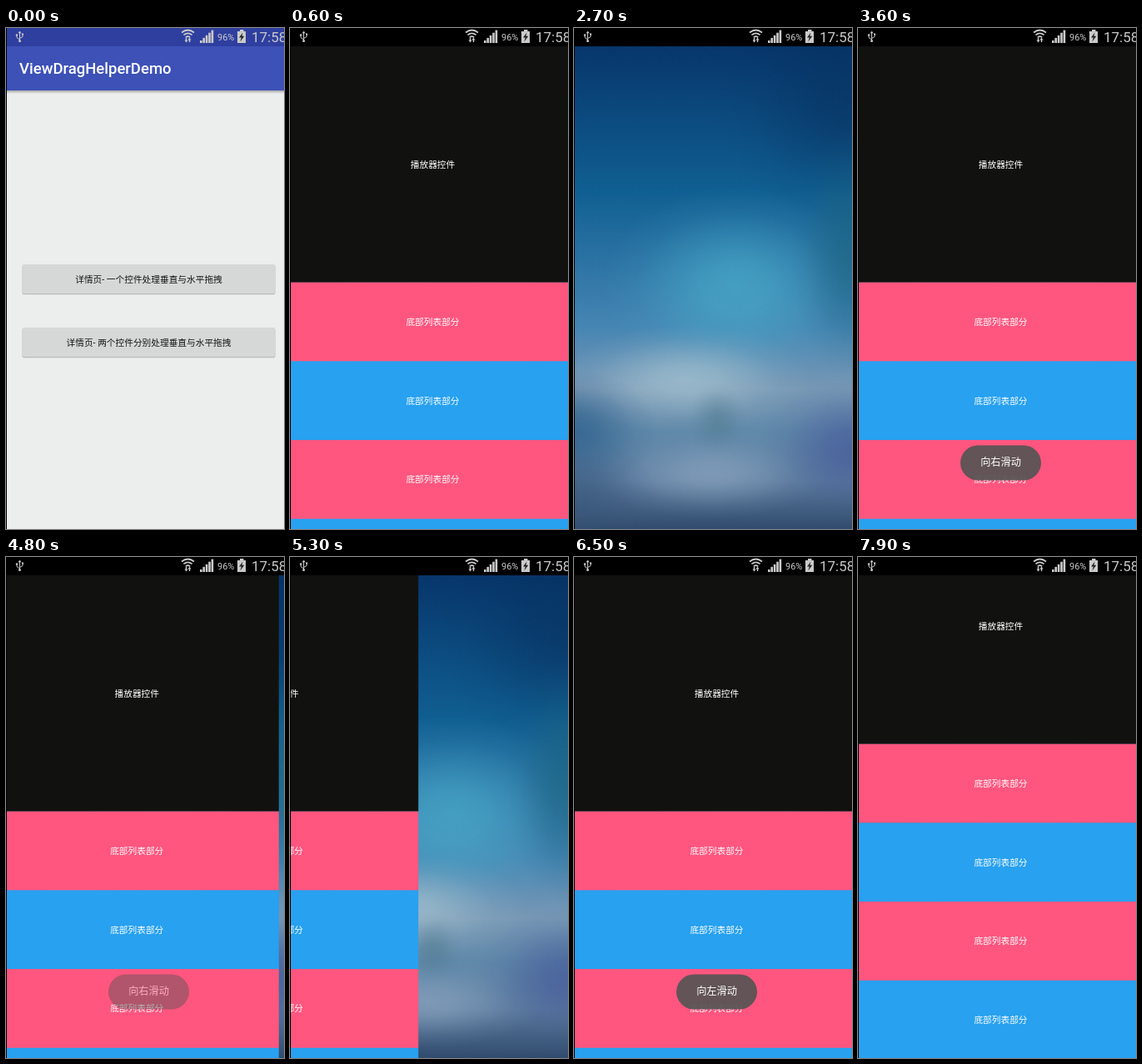
Write an HTML page that moves like this. It is 334 by 602 pixels and loops after 8 s.

```html
<!DOCTYPE html>
<html lang="zh-CN">
<head>
<meta charset="utf-8">
<title>ViewDragHelperDemo</title>
<style>
  html, body { margin: 0; width: 100%; height: 100%; overflow: hidden; background: #000; }
  svg { display: block; width: 334px; height: 602px; }
  text { font-family: Roboto, "Noto Sans CJK SC", "Noto Sans CJK", sans-serif; }
  .label { font-size: 10.7px; text-anchor: middle; }
</style>
</head>
<body>
<svg viewBox="0 0 334 602">
  <defs>
    <linearGradient id="sky" x1="0" y1="22" x2="0" y2="602" gradientUnits="userSpaceOnUse">
      <stop offset="0" stop-color="#07366b"/>
      <stop offset=".3" stop-color="#105f92"/>
      <stop offset=".58" stop-color="#4585b3"/>
      <stop offset=".71" stop-color="#7898b5"/>
      <stop offset=".8" stop-color="#5f88a9"/>
      <stop offset=".9" stop-color="#5b7a9d"/>
      <stop offset="1" stop-color="#304b6d"/>
    </linearGradient>
    <linearGradient id="drop" x1="0" y1="0" x2="0" y2="1">
      <stop offset="0" stop-opacity=".3"/>
      <stop offset="1" stop-opacity="0"/>
    </linearGradient>
  </defs>

  <g id="menu">
    <rect width="334" height="602" fill="#eceeed"/>
    <rect y="75" width="334" height="4" fill="url(#drop)"/>
    <rect width="334" height="75" fill="#3d51b7"/>
    <rect width="334" height="22" fill="#2f3f9f"/>
    <text x="16" y="55" font-size="18.5" font-weight="500" fill="#fff">ViewDragHelperDemo</text>
  </g>

  <g id="detail">
    <g id="page">
      <g id="wallpaper"><rect y="22" width="334" height="640" fill="url(#sky)"/></g>
      <g id="panel"><rect id="player" x="1" width="341" fill="#11120f"/></g>
    </g>
    <rect width="334" height="22" fill="#000"/>
  </g>

  <g id="toast">
    <rect x="123" y="501.5" width="97" height="42" rx="21" fill="#595456" opacity=".94"/>
    <text id="toastText" x="171.5" y="526.3" font-size="12.2" text-anchor="middle" fill="#fff"></text>
  </g>

  <g id="status" fill="#cacaca">
    <path d="M16.5 5V16M16.5 14L13 11.5V9M16.5 12.5L20 10.5V7.5M15 6.5L16.5 4L18 6.5" fill="none" stroke="#cacaca"/>
    <circle cx="16.5" cy="15.5" r="1.5"/>
    <circle cx="13" cy="8.5" r="1.2"/>
    <rect x="19" y="6.5" width="2" height="2"/>
    <path d="M214.5 14.5L216.5 17.5L218.5 14.5H217.2V12H215.8V14.5Z"/>
    <path d="M218.5 14.5L220.5 11.5L222.5 14.5H221.2V17H219.8V14.5Z"/>
    <text x="254" y="14.5" font-size="11">96%</text>
    <path d="M281 2h4.5v2H288v14h-10V4h3Z"/>
    <path d="M284.5 5.5L280 11.5H282.8L281.3 16.5L286.3 9.8H283.4Z" fill="#222"/>
    <text x="295" y="17" font-size="17">17:58</text>
  </g>
  <rect width="1" height="602" fill="#000"/>
</svg>

<script>
const LOOP = 8000, STEP = 100, WIDTH = 341, CENTER = 171.5;
const LIST_TOP = 305.7, ROW = 94.7;
const $ = id => document.getElementById(id);

function add(parent, tag, attrs, text = "") {
  const el = document.createElementNS("http://www.w3.org/2000/svg", tag);
  for (const k in attrs) el.setAttribute(k, attrs[k]);
  el.textContent = text;
  parent.append(el);
  return el;
}

const label = (parent, y, text, fill) =>
  add(parent, "text", { class: "label", x: CENTER, y: y + 4, fill }, text);

function button(y, text) {
  const box = { x: 19.5, width: 304, height: 35, rx: 2 };
  add($("menu"), "rect", { ...box, y: y + 1.2, fill: "#b9bbba" });
  add($("menu"), "rect", { ...box, y, fill: "#d6d7d7" });
  label($("menu"), y + 17.5, text, "#151515");
}

// Soft elliptical glow on the wallpaper
function glow(x, y, rx, ry, color, alpha) {
  const id = `glow${x}_${y}`;
  const grad = add(document.querySelector("defs"), "radialGradient", { id });
  for (const r of [0, 0.25, 0.5, 0.75, 1])
    add(grad, "stop", { offset: r, "stop-color": color, "stop-opacity": alpha * (1 - smooth(r)) });
  add($("wallpaper"), "ellipse", { cx: x, cy: y, rx, ry, fill: `url(#${id})` });
}

const progress = (t, from, to) => Math.min(1, Math.max(0, (t - from) / (to - from)));
const smooth = p => p * p * (3 - 2 * p);
const easeOut = p => 1 - (1 - p) ** 2;

button(284, "详情页- 一个控件处理垂直与水平拖拽");
button(360, "详情页- 两个控件分别处理垂直与水平拖拽");

glow(334, 90, 160, 150, "#062c5a", 0.5);
glow(195, 310, 160, 120, "#4cb2cf", 0.65);
glow(334, 270, 75, 150, "#1c6480", 0.65);
glow(135, 422, 150, 65, "#b0ccd6", 0.6);
glow(165, 535, 140, 55, "#93acc6", 0.6);
glow(0, 485, 100, 75, "#2c5f8b", 0.75);
glow(0, 560, 100, 70, "#36557a", 0.6);
glow(334, 505, 110, 85, "#45599a", 0.7);
glow(172, 470, 36, 44, "#4a7688", 0.45);

for (let i = 0; i < 5; i++) {
  const y = LIST_TOP + i * ROW;
  add($("panel"), "rect", { x: 1, y, width: WIDTH, height: ROW + 0.3, fill: i % 2 ? "#27a1f0" : "#ff567f" });
  label($("panel"), y + ROW / 2, "底部列表部分", "#fff");
}
label($("panel"), 164, "播放器控件", "#fff");

// Signal bars and wireless arcs
for (let i = 0; i < 5; i++) {
  const h = 3 + i * 3.1;
  add($("status"), "rect", { x: 233 + i * 3.4, y: 18 - h, width: 2.6, height: h });
}
for (let i = 0; i < 3; i++) {
  const r = 7.5 - i * 2.4, y = 5.5 + i * 2.9;
  add($("status"), "path", {
    d: `M${218.5 - r} ${y}Q218.5 ${y - r * 0.8} ${218.5 + r} ${y}`,
    fill: "none", stroke: "#cacaca", "stroke-width": 1.7
  });
}

// Pull right and ease back a little, then fling off the edge
const swipeRight = t =>
  107.5 * Math.sin(0.77 * Math.PI * progress(t, 1300, 2000)) + 271 * progress(t, 2400, 2700);
const swipeLeft = t => -(WIDTH + 1) * smooth(progress(t, 4650, 5870));

function dragX(t) {
  if (t < 3100) return swipeRight(t);
  return t < 6100 ? swipeLeft(t) : 0;
}

const pulse = (t, start, full, end, gone) => progress(t, start, full) - progress(t, end, gone);

function draw(now) {
  const t = Math.floor(now % LOOP / STEP) * STEP;
  const fade = easeOut(progress(t, 200, 600));
  const dragY = -81 * progress(t, 7400, 7900);
  $("detail").setAttribute("opacity", fade);
  $("page").setAttribute("transform", `translate(0 ${36 * (1 - fade)})`);
  $("panel").setAttribute("transform", `translate(${dragX(t)} ${dragY})`);
  // Keep the player filled to the top while the page scrolls up
  $("player").setAttribute("y", -dragY);
  $("player").setAttribute("height", LIST_TOP + dragY);
  $("toast").setAttribute("opacity", pulse(t, 3000, 3600, 4600, 5000) + pulse(t, 6000, 6500, 7400, 7800));
  $("toastText").textContent = t < 6000 ? "向右滑动" : "向左滑动";
}

const start = performance.now();
function tick() {
  draw(performance.now() - start);
  requestAnimationFrame(tick);
}
tick();
</script>
</body>
</html>
```
